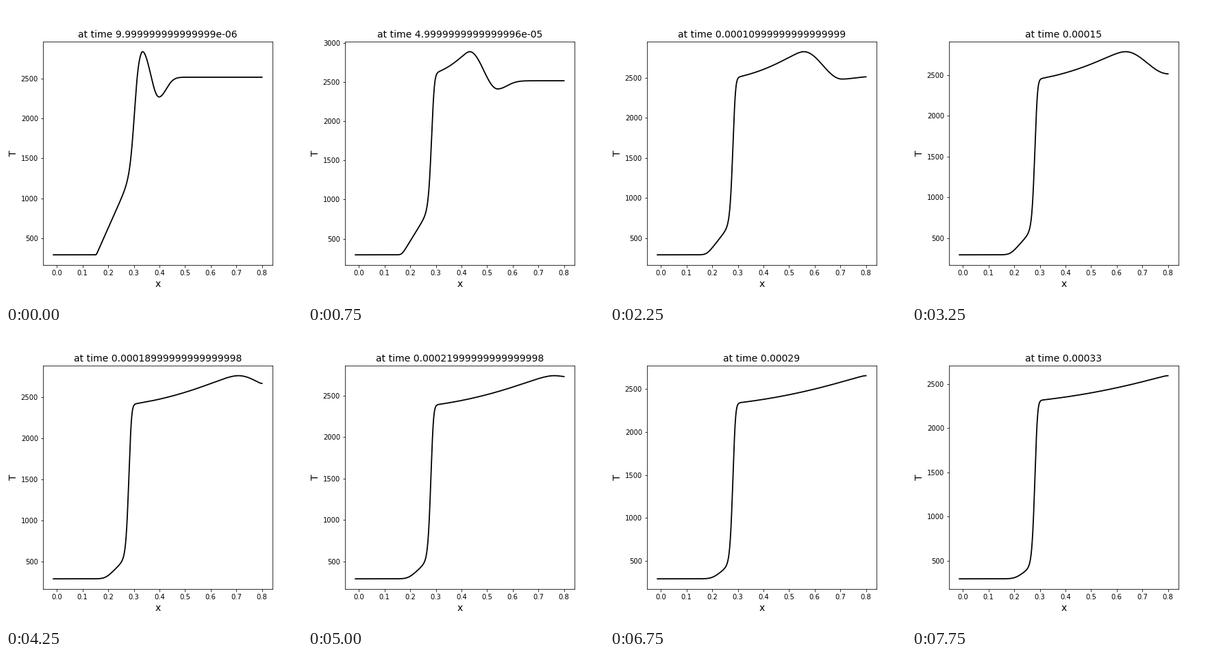
Animation of 432x432 px, one loop 8 s. Source, as a matplotlib script:

```python
import numpy as np
import matplotlib.pyplot as plt
from matplotlib.animation import FuncAnimation

FRAMES = 32
INTERVAL = 250
DT = 1e-7
STEPS_PER_SAVE = 100

T_COLD = 293
X_LEFT, X_RIGHT = -0.0137, 0.8
X_HOT = 0.3          # where the hot side begins


def startup(n):
    """Initial transient, 1 at the first save and soon gone."""
    return np.exp(-(n - 1) / 2)


def cold_side(x, n):
    """Ramp that starts softly, then flattens and retreats over time."""
    start = 0.1425 + 0.011 * np.sqrt(n)
    slope = 9200 * np.exp(-0.245 * np.sqrt(n))
    soft = 0.0125 * (1 - np.exp(-n / 11))
    return T_COLD + slope * soft * np.logaddexp(0, (x - start) / soft)


def hot_side(x, n):
    """Plateau with a travelling crest, followed by a dip and a flat tail."""
    x = X_RIGHT - np.hypot(X_RIGHT - x, 0.01)   # zero gradient at the wall
    base_t = 2932 - 176 * np.log(n) - 212 * startup(n)
    peak_t = 3134 - 128 * np.log(n) - 291 * startup(n)
    dip_t = 2268 + 90 * np.log(n)
    tail_t = 2514 + 0.6 * n
    peak_x = 0.2963 + 0.0357 * n ** 0.83
    dip_x = 0.337 + 0.061 * n ** 0.75
    dip_width = 0.0257 + 0.0023 * n

    s = np.clip((x - X_HOT) / (peak_x - X_HOT), 0, 1)
    rise = base_t + (peak_t - base_t) * (0.55 * s + 0.595 * s**2 - 0.145 * s**12)
    u = np.clip((x - peak_x) / (dip_x - peak_x), 0, 1)
    fall = dip_t + (peak_t - dip_t) * (1 + np.cos(np.pi * u)) / 2
    tail = tail_t + (dip_t - tail_t) * np.exp(-((x - dip_x) / dip_width) ** 2 / 2)
    return np.where(x < peak_x, rise, np.where(x < dip_x, fall, tail))


def temperature(x, n):
    centre = 0.2803 + 0.0217 * startup(n)
    width = 0.0057 + 0.0028 * startup(n)
    z = (x - centre) / width
    z = z + 0.09 * np.maximum(z, 0) ** 2        # sharper knee on the hot side
    front = (1 + np.tanh(z / 2)) / 2
    return cold_side(x, n) * (1 - front) + hot_side(x, n) * front


plt.rcParams["font.family"] = "DejaVu Sans"
fig, ax = plt.subplots(figsize=(6, 6), dpi=72)
fig.subplots_adjust(left=0.125, right=0.9, bottom=0.125, top=0.88)
x = np.linspace(X_LEFT, X_RIGHT, 1000)
line, = ax.plot(x, temperature(x, 1), color="black", lw=1.8)
ax.set_xlabel("x", fontsize=14)
ax.set_ylabel("T", fontsize=14)
title = ax.set_title("", fontsize=14)


def update(k):
    n = 1 if k == 0 else k + 2      # the second save is not shown
    line.set_ydata(temperature(x, n))
    ax.relim()
    ax.autoscale_view()
    title.set_text(f"at time {STEPS_PER_SAVE * n * DT}")
    return line, title


anim = FuncAnimation(fig, update, frames=FRAMES, interval=INTERVAL,
                     repeat=True, repeat_delay=0, blit=False)
plt.show()
```
